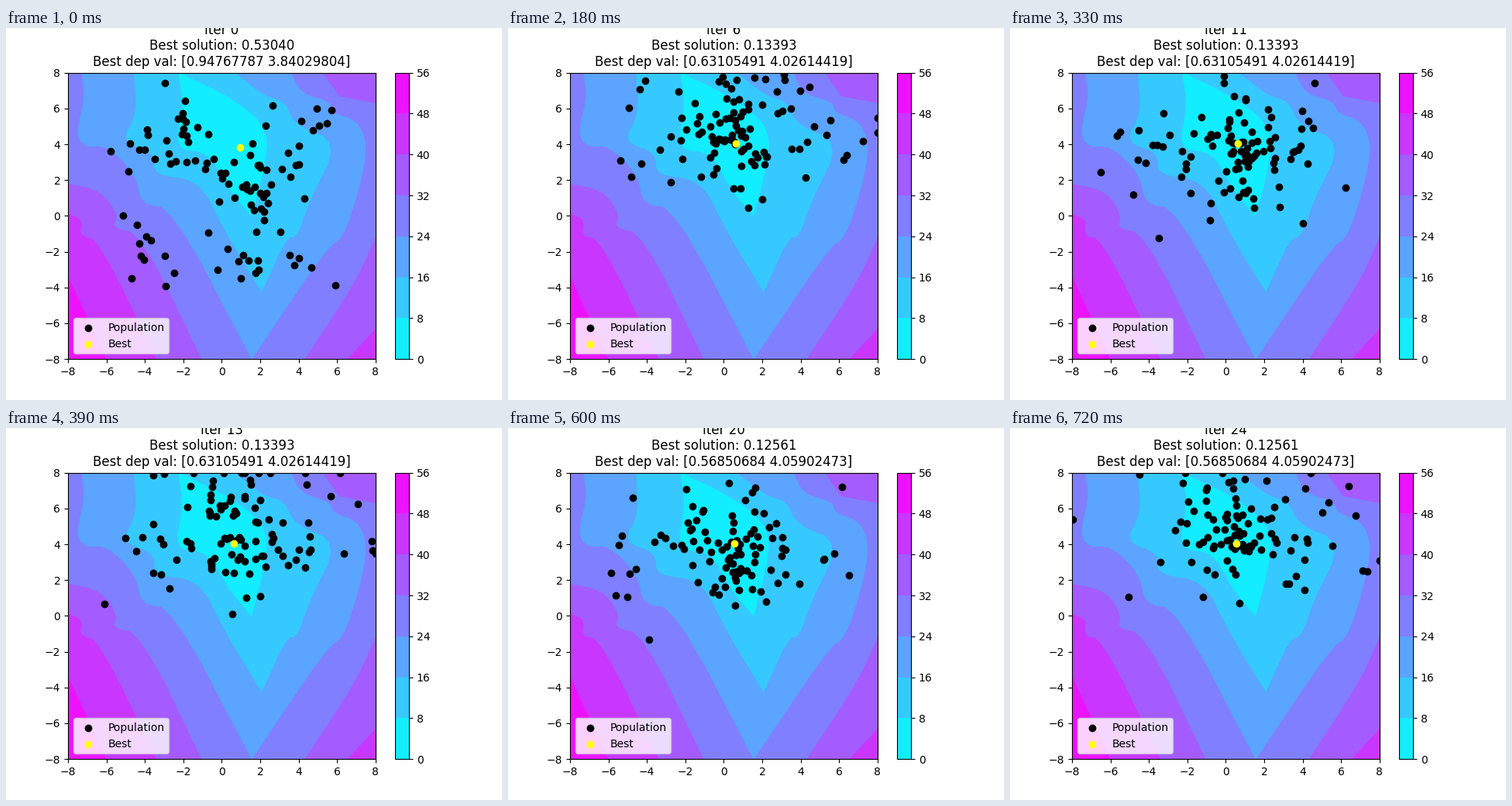
A matplotlib script for the animation above (750 ms loop, 640 px wide and 480 px high).

```python
import numpy as np
import matplotlib.pyplot as plt
from matplotlib.animation import FuncAnimation
from matplotlib.cm import ScalarMappable
from matplotlib.colors import BoundaryNorm, ListedColormap

FRAMES, STEP_MS = 25, 30
LOW, HIGH = -8, 8
LEVELS = np.arange(0, 57, 8)
COLORS = plt.get_cmap("cool")((LEVELS[:-1] + 4) / 56)

# (first iteration, value, position) of each best solution
BESTS = [
    (0, 0.53040, (0.94767787, 3.84029804)),
    (3, 0.13393, (0.63105491, 4.02614419)),
    (15, 0.12561, (0.56850684, 4.05902473)),
]


def to_data(points):
    """Stage pixels to axes units."""
    p = np.asarray(points, float)
    return np.column_stack([(p[:, 0] - 80) / 24.8 - 8,
                            8 - (p[:, 1] - 57.6) / 23.1])


def smooth(points, rounds=2):
    """Corner cutting that keeps both ends."""
    p = np.asarray(points, float)
    for _ in range(rounds):
        a, b = p[:-1], p[1:]
        cut = np.stack([0.75 * a + 0.25 * b, 0.25 * a + 0.75 * b], axis=1)
        p = np.vstack([p[:1], cut.reshape(-1, 2), p[-1:]])
    return p


# Each region's left edge runs downwards, its right edge upwards.
TL, TR, BR = (80, 57), (477, 57), (477, 428)
REGIONS = [
    ([(80, 320), (130, 428)], [BR, TR], [TL]),
    ([(80, 240), (99, 247), (95, 269), (119, 272), (195, 428)],
     [(440, 428), (477, 388)], [TR, TL]),
    ([(80, 201), (124, 210), (145, 243), (137, 258), (174, 265), (253, 428)],
     [(385, 428), (450, 330), (477, 270)], [(477, 97), (430, 88), (408, 57), TL]),
    ([(97, 57), (102, 88), (90, 137), (102, 154), (131, 152), (168, 190),
      (174, 228), (215, 232), (317, 428)],
     [(317, 428), (415, 282), (435, 272), (457, 205), (467, 150), (453, 119),
      (422, 110), (419, 95), (381, 85), (368, 57)], []),
    ([(165, 57), (169, 112), (148, 147), (192, 161), (190, 190), (250, 196),
      (280, 259), (330, 341)],
     [(330, 341), (362, 270), (376, 270), (391, 224), (430, 147), (372, 125),
      (360, 94), (333, 88), (295, 57)], []),
    ([(222, 57), (229, 100), (217, 157), (262, 160), (286, 207), (317, 243)],
     [(317, 243), (332, 188), (340, 132), (297, 93), (222, 57)], []),
]

# Starting clusters: count, centre, spread
CLUSTERS = [
    (28, (-2.0, 4.4), (1.5, 1.5)),
    (40, (2.0, 1.9), (1.6, 1.4)),
    (13, (2.0, -2.2), (1.6, 1.0)),
    (10, (-3.9, -1.3), (0.7, 1.8)),
    (7, (4.3, 5.3), (1.2, 0.9)),
    (2, (0.5, -5.0), (6.5, 1.2)),
]


def best_at(i):
    return [b for b in BESTS if b[0] <= i][-1]


def cost(p):
    return np.abs(p - BESTS[-1][2]) @ [1.0, 1.2]


def simulate():
    """Particle swarm: pulled to each own best and to the common best."""
    rng = np.random.default_rng(7)
    pos = np.vstack([rng.normal(mid, spread, (n, 2))
                     for n, mid, spread in CLUSTERS])
    pos = np.clip(pos, LOW, HIGH)
    vel = rng.normal(0, 1, pos.shape) * [1.6, 0.8]
    own = pos.copy()
    path = [pos]
    for i in range(1, FRAMES):
        r1, r2 = rng.random((2, *pos.shape))
        vel = (0.98 * vel + 0.25 * r1 * (own - pos)
               + 0.6 * r2 * (np.array(best_at(i)[2]) - pos))
        free = pos + vel
        pos = np.clip(free, LOW, HIGH)
        vel[free != pos] *= 0.5
        better = cost(pos) < cost(own)
        own[better] = pos[better]
        path.append(pos)
    return path


fig, ax = plt.subplots(figsize=(6.4, 4.8), dpi=100)
ax.set_facecolor(COLORS[-1])
for (left, right, rest), color in zip(REGIONS, COLORS[-2::-1]):
    outline = [*smooth(left), *smooth(right), *rest]
    ax.add_patch(plt.Polygon(to_data(outline), fc=color, ec="none", zorder=0))

shades = ScalarMappable(BoundaryNorm(LEVELS, 7), ListedColormap(COLORS))
fig.colorbar(shades, ax=ax, ticks=LEVELS).minorticks_off()

swarm_path = simulate()
swarm = ax.scatter(*swarm_path[0].T, color="black", label="Population")
best_dot = ax.scatter(*BESTS[0][2], color="yellow", label="Best")
ax.set(xlim=(LOW, HIGH), ylim=(LOW, HIGH),
       xticks=range(LOW, HIGH + 1, 2), yticks=range(LOW, HIGH + 1, 2))
ax.legend(loc="lower left")
title = ax.set_title("")


def update(i):
    _, value, (x, y) = best_at(i)
    swarm.set_offsets(swarm_path[i])
    best_dot.set_offsets([(x, y)])
    title.set_text(f"Iter {i}\nBest solution: {value:.5f}\n"
                   f"Best dep val: [{x:.8f} {y:.8f}]")
    return swarm, best_dot, title


anim = FuncAnimation(fig, update, frames=FRAMES, interval=STEP_MS,
                     repeat=True, repeat_delay=0, blit=False)
plt.show()
```
